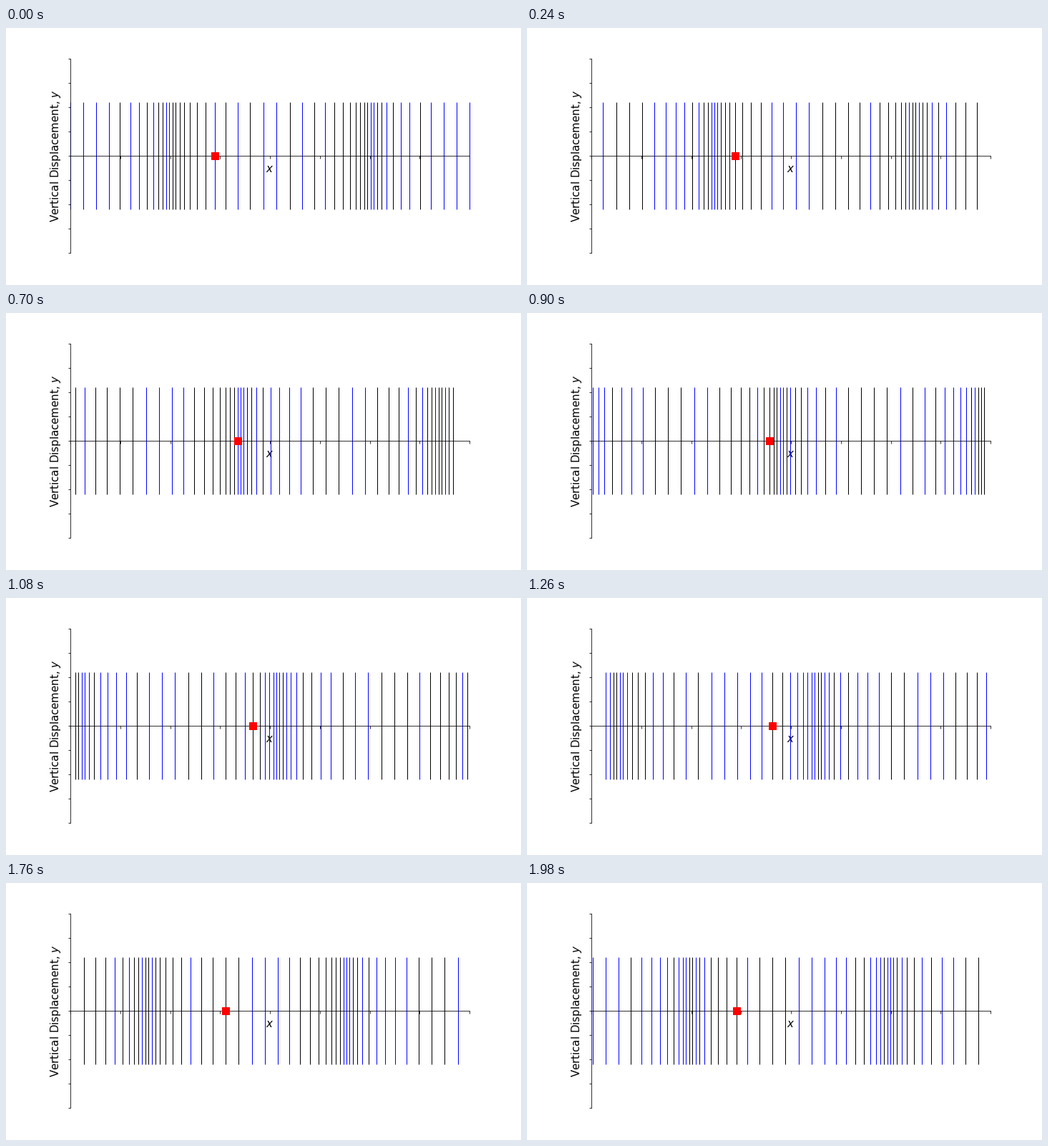
A matplotlib script that plays this animation: 720 by 360 pixels, repeating every 2000 ms.

```python
import numpy as np
import matplotlib.pyplot as plt
from matplotlib.animation import FuncAnimation
from matplotlib.transforms import IdentityTransform

W, H, DPI = 720, 360, 72
FRAMES, INTERVAL = 100, 20
LEFT, RIGHT = 0.125 * W, 0.9 * W

# x is measured in wavelengths
SPAN, AMP, TRACKED = 2, 0.1, 20
rest = np.linspace(0, SPAN, 50)

plt.rcParams["font.family"] = "DejaVu Sans"
plt.rcParams["mathtext.fontset"] = "dejavusans"

fig, ax = plt.subplots(figsize=(W / DPI, H / DPI), dpi=DPI, facecolor="white")
fig.subplots_adjust(left=0.125, right=0.9, bottom=0.125, top=0.88)
ax.set(xlim=(0, SPAN), ylim=(-2, 2))
ax.spines[["top", "right"]].set_visible(False)
ax.spines["bottom"].set_position(("data", 0))
ax.set_xticks(np.arange(0, SPAN + 0.01, 0.25), labels=[])
ax.set_yticks(np.arange(-2, 2.01, 0.5), labels=[])


def label(x, y, text, angle=0):
    ax.text(x, y, text, fontsize=15, rotation=angle, rotation_mode="anchor",
            ha="center", va="baseline", zorder=1.5,
            transform=IdentityTransform())


label(369, H - 202, "$x$")
label(74, 180.9, "Vertical Displacement, $y$", 90)


def bars(color):
    return ax.plot([], [], "|", color=color, ms=150, mew=1)[0]


even, odd = bars("blue"), bars("black")
dot, = ax.plot([], [], "s", color="red", ms=10, mew=1, zorder=5)


def update(i):
    x = rest + AMP * np.sin(2 * np.pi * (rest - i / FRAMES))
    # bars on odd pixel columns appear black
    column = np.floor(LEFT + x * (RIGHT - LEFT) / SPAN + 0.5).astype(int)
    for line, parity in ((even, 0), (odd, 1)):
        xs = x[column % 2 == parity]
        line.set_data(xs, np.zeros_like(xs))
    dot.set_data([x[TRACKED]], [0])
    return even, odd, dot


anim = FuncAnimation(fig, update, frames=FRAMES, interval=INTERVAL,
                     repeat=True, repeat_delay=0)
plt.show()
```
